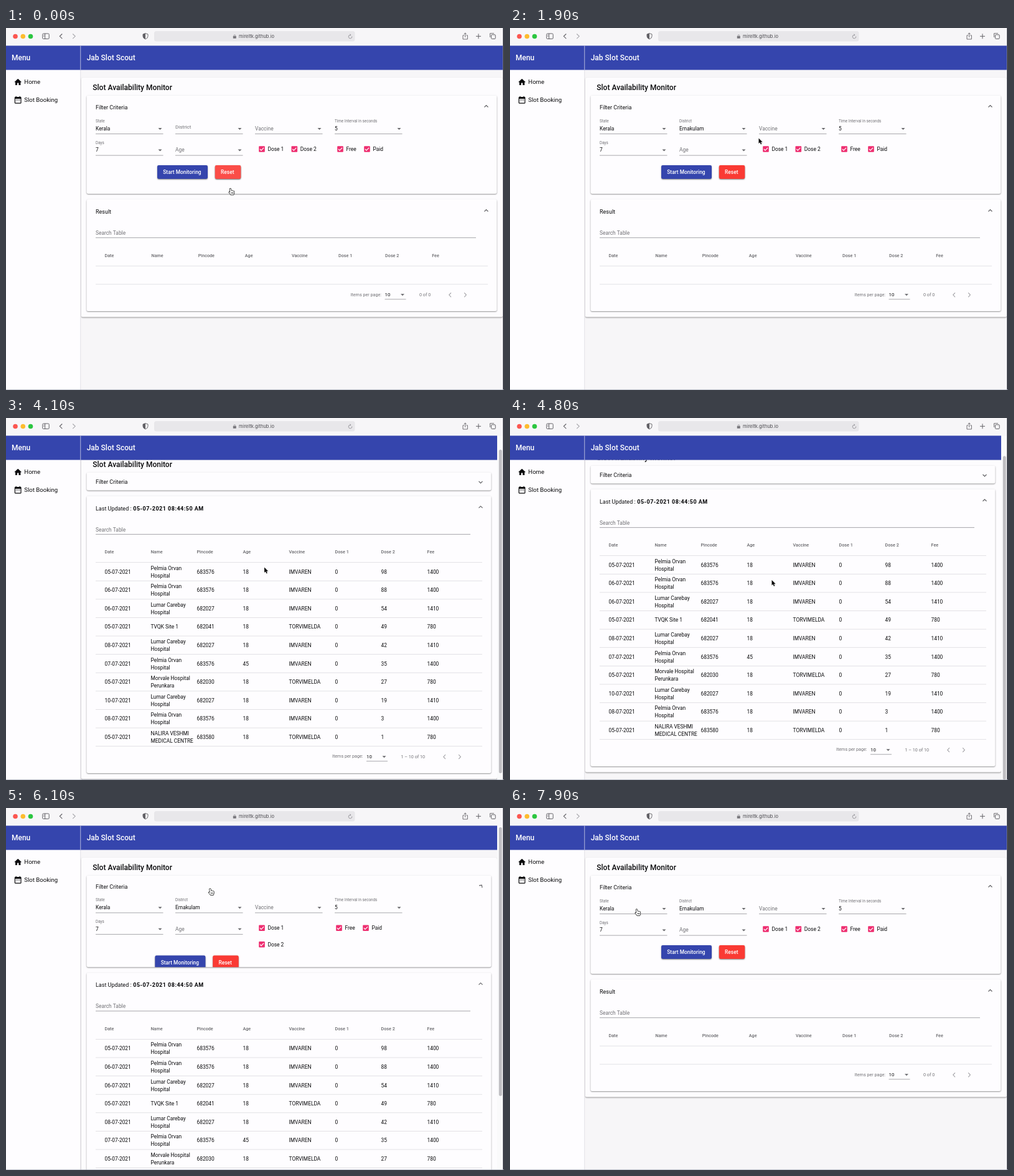
These frames come from a looping animation (800x583 px, 8 s). An HTML page with a canvas:

```html
<!DOCTYPE html>
<html lang="en">
<head>
<meta charset="utf-8">
<title>Slot Availability Monitor</title>
<style>
html, body { margin: 0; width: 100%; height: 100%; overflow: hidden; background: #f7f6f8; }
canvas { display: block; width: 800px; height: 583px; }
</style>
</head>
<body>
<canvas id="stage"></canvas>
<script>
const W = 800, H = 583, LOOP = 8000;
const cv = document.getElementById('stage'), g = cv.getContext('2d');
const dpr = window.devicePixelRatio || 1;
cv.width = W * dpr;
cv.height = H * dpr;

const INK = '#0b0b0d', GREY = '#717175', BLUE = '#3545ad', RED = '#fa3a34', PINK = '#ee2e70';
const BAR_TOP = 28.5, BAR_END = 67.5;

// Event times in ms
const PICK = 1650, START = 2736, DATA = 3200, EXPAND = 5983, RESET = 7050;

// time, x, y, pointing hand
const POINTER = [
  [0, 359.5, 258.5, 1], [150, 359, 255, 1], [700, 330, 160, 1], [1000, 330, 161, 1],
  [1450, 305, 186, 1], [1700, 306, 187, 1], [1900, 399.5, 177.5, 0], [2000, 402, 178, 0],
  [2500, 306, 231, 1], [2900, 306.5, 232, 1], [3300, 308, 233, 0], [3750, 400, 235, 0],
  [4100, 415, 240.5, 0], [4800, 420.5, 261, 0], [5300, 416, 240, 0], [5850, 327, 130, 1],
  [6200, 327, 130, 1], [6800, 352, 270, 1], [7150, 352, 270, 1], [7800, 202.5, 163, 1],
  [8000, 202.5, 163, 1]
];
const SCROLL = [[0, 0], [3750, 0], [4100, 21], [4400, 32], [5000, 32], [5450, 0], [8000, 0]];

const HOSP = {
  a: 'Pelmia Orvan|Hospital', b: 'Lumar Carebay|Hospital', c: 'TVQK Site 1',
  d: 'Morvale Hospital|Perunkara', e: 'NALIRA VESHMI|MEDICAL CENTRE'
};
const PIN = { a: 683576, b: 682027, c: 682041, d: 682030, e: 683580 };
const FEE = { a: 1400, b: 1410 };
// day, hospital, second doses, age
const ROWS = [
  [5, 'a', 98], [6, 'a', 88], [6, 'b', 54], [5, 'c', 49], [8, 'b', 42],
  [7, 'a', 35, 45], [5, 'd', 27], [10, 'b', 19], [8, 'a', 3], [5, 'e', 1]
];
const HEADS = ['Date', 'Name', 'Pincode', 'Age', 'Vaccine', 'Dose 1', 'Dose 2', 'Fee'];

const HOME = new Path2D('M10 20v-6h4v6h5v-8h3L12 3 2 12h3v8z');
const CALENDAR = new Path2D('M9 11H7v2h2zm4 0h-2v2h2zm4 0h-2v2h2zm2-7h-1V2h-2v2H8V2H6v2H5c-1.1 0-2 .9-2 2v14c0 1.1.9 2 2 2h14c1.1 0 2-.9 2-2V6c0-1.1-.9-2-2-2zm0 16H5V9h14z');
const ARROW = new Path2D('M0 0V8.6L2 6.8L3.4 10L4.9 9.3L3.5 6.3H6.2Z');
const HAND = new Path2D('M0 .8C0-.4 1.7-.4 1.8.8L2.3 3.6Q3.3 3 3.9 3.8Q4.9 3.3 5.4 4.2Q6.6 3.8 6.9 5V7.4L6 10H1.8L-.9 6.9Q-1.8 5.6-.5 5.5L.7 6.2Z');

const clamp = v => Math.max(0, Math.min(1, v));
const mix = (a, b, k) => a + (b - a) * k;

// Standard material curve: cubic-bezier(.4, 0, .2, 1)
function ease(x) {
  x = clamp(x);
  let lo = 0, hi = 1, s;
  for (let i = 0; i < 20; i++) {
    s = (lo + hi) / 2;
    const r = 1 - s;
    if (1.2 * r * r * s + .6 * r * s * s + s * s * s < x) lo = s; else hi = s;
  }
  return s * s * (3 - 2 * s);
}

function segment(keys, t) {
  let i = 0;
  while (i < keys.length - 2 && t >= keys[i + 1][0]) i++;
  const a = keys[i], b = keys[i + 1];
  return [a, b, clamp((t - a[0]) / (b[0] - a[0]))];
}

function text(s, x, cy, size = 8.4, color = INK, weight = 400, spacing = 0, family = 'Roboto') {
  g.font = `${weight} ${size}px ${family}, sans-serif`;
  g.letterSpacing = spacing + 'px';
  g.fillStyle = color;
  g.fillText(s, x, cy + size * .355);
}

function rect(x, y, w, h, color) {
  g.fillStyle = color;
  g.fillRect(x, y, w, h);
}

function round(x, y, w, h, r, color) {
  g.beginPath();
  g.roundRect(x, y, w, h, r);
  g.fillStyle = color;
  g.fill();
}

function line(points, color, width = 1) {
  g.beginPath();
  points.forEach(([x, y], i) => i ? g.lineTo(x, y) : g.moveTo(x, y));
  g.strokeStyle = color;
  g.lineWidth = width;
  g.stroke();
}

function disc(x, y, r, color) {
  g.beginPath();
  g.arc(x, y, r, 0, 7);
  g.fillStyle = color;
  g.fill();
}

function raised(x, y, w, h, color, alpha = .42) {
  g.save();
  g.shadowColor = `rgba(0,0,0,${alpha})`;
  g.shadowBlur = 2 * dpr;
  g.shadowOffsetY = dpr;
  round(x, y, w, h, 2.4, color);
  g.restore();
}

function chevron(x, y, turn) {
  g.save();
  g.translate(x, y);
  g.rotate(turn * Math.PI);
  line([[-3, 0], [0, -3], [3, 0]], '#5c5c60', 1.1);
  g.restore();
}

function caret(x, y) {
  g.beginPath();
  g.moveTo(x - 3, y - 1.5);
  g.lineTo(x + 3, y - 1.5);
  g.lineTo(x, y + 1.5);
  g.fillStyle = '#69696d';
  g.fill();
}

function icon(path, x, y) {
  g.save();
  g.translate(x, y);
  g.scale(.6, .6);
  g.fillStyle = '#0c0c0e';
  g.fill(path);
  g.restore();
}

function field(label, value, x, y, up = value ? 1 : 0) {
  text(label, x, y - 12 * up, 8.4 - 2.1 * up, GREY);
  if (value) text(value, x, y);
  caret(x + 103.5, y + .5);
  rect(x, y + 8.2, 108.5, .8, '#949498');
}

function check(label, x, y) {
  round(x - 4.8, y - 4.8, 9.6, 9.6, 1, PINK);
  line([[x - 3, y], [x - 1, y + 2.1], [x + 3.1, y - 2.2]], '#fff', 1.2);
  text(label, x + 9.5, y);
}

function button(label, x, y, w, color, glow = 0) {
  raised(x, y - 11, w, 22, color, .5 + glow);
  if (glow) round(x, y - 11, w, 22, 2.4, `rgba(255,255,255,${glow})`);
  text(label, x + 9.3, y, 8.4, '#fff', 500);
}

function browser() {
  rect(0, 0, W, H, '#f7f6f8');
  disc(15, 13.5, 3.8, '#fc5650');
  disc(27.3, 13.5, 3.8, '#fdbc2e');
  disc(39.5, 13.5, 3.8, '#2bc640');
  const ink = '#626166';
  g.lineWidth = 1;
  g.strokeStyle = ink;
  g.beginPath();
  g.roundRect(58.8, 9, 10.4, 8.5, 1.5);
  g.moveTo(62.6, 9);
  g.lineTo(62.6, 17.5);
  g.stroke();
  line([[60, 11.5], [61.5, 11.5]], ink, .7);
  line([[60, 13.5], [61.5, 13.5]], ink, .7);
  line([[90.3, 9.5], [86.3, 13.3], [90.3, 17.1]], ink, 1.1);
  line([[107.2, 9.5], [111.2, 13.3], [107.2, 17.1]], '#a9a8ad', 1.1);
  const shield = new Path2D('M224 8.6L228 10V13.3Q228 16.4 224 18Q220 16.4 220 13.3V10Z');
  g.lineWidth = .9;
  g.strokeStyle = ink;
  g.stroke(shield);
  g.fillStyle = ink;
  g.fill(new Path2D('M224 8.6V18Q220 16.4 220 13.3V10Z'));
  round(238, 5, 322.5, 16.5, 3.5, '#e8e7ea');
  round(364.8, 13, 5, 3.8, .6, '#77767b');
  g.beginPath();
  g.arc(367.3, 12.7, 1.5, Math.PI, 0);
  g.strokeStyle = '#77767b';
  g.lineWidth = .8;
  g.stroke();
  text('mireltk.github.io', 374, 13.6, 7.5, '#4b4a4f', 400, 0, 'Inter');
  g.beginPath();
  g.arc(553, 14, 2.8, -.2, 5);
  g.strokeStyle = '#88878c';
  g.stroke();
  line([[552.6, 9.7], [554, 11.2], [552.4, 12.5]], '#88878c', .8);
  line([[736, 11.8], [734, 11.8], [734, 18], [741.4, 18], [741.4, 11.8], [739.4, 11.8]], ink, .9);
  line([[737.7, 15], [737.7, 8]], ink, .9);
  line([[735.8, 9.8], [737.7, 7.9], [739.6, 9.8]], ink, .9);
  line([[755, 13.3], [763, 13.3]], ink);
  line([[759, 9.3], [759, 17.3]], ink);
  g.beginPath();
  g.roundRect(779.5, 10.8, 6.7, 6.7, 1);
  g.strokeStyle = ink;
  g.stroke();
  line([[777.6, 15], [777.6, 8.7], [784, 8.7]], ink, .9);
}

function sidebar() {
  rect(0, BAR_END, 119.5, H - BAR_END, '#fefdff');
  rect(119.4, BAR_END, .8, H - BAR_END, '#dedde1');
  icon(HOME, 12, 80);
  text('Home', 29.3, 87, 9.6);
  icon(CALENDAR, 12, 108.6);
  text('Slot Booking', 29.3, 116, 9.6);
}

function toolbar(right) {
  rect(0, BAR_TOP, right, BAR_END - BAR_TOP, BLUE);
  rect(119.4, BAR_TOP, .8, BAR_END - BAR_TOP, '#d3d5ea');
  text('Menu', 9, 48.2, 12, '#fff', 500);
  text('Jab Slot Scout', 129.7, 48.2, 12, '#fff', 500);
}

function filterPanel(t, top, height, right, open, wide) {
  raised(129.5, top, right - 129.5, height, '#fefdff');
  g.save();
  g.beginPath();
  g.rect(129.5, top, right - 129.5, height);
  g.clip();
  const head = top + 14.5 + 4.5 * open;
  text('Filter Criteria', 144, head + .4, 9);
  chevron(right - 17, head, 1 - open);
  if (open > 0) {
    g.translate(0, -9 * (1 - open));
    const settle = .2 * (1 - clamp(t / 100));
    const picked = t >= PICK;
    field('State', 'Kerala', 144, 162);
    field('District', picked ? 'Ernakulam' : '', 272, 162, picked ? ease((t - PICK) / 240) : settle);
    field('Vaccine', '', 400, 162);
    field('Time Interval in seconds', '5', 528, 162);
    field('Days', '7', 144, 196.5);
    field('Age', '', 272, 196.5);
    check('Dose 1', 411, 195);
    if (wide) check('Dose 2', 411, 221.5); else check('Dose 2', 463.3, 195);
    const dx = wide ? -2 : 0;
    check('Free', 537 + dx, 195);
    check('Paid', 580 + dx, 195);
    const by = wide ? 250.3 : 232, bx = wide ? -3.6 : 0;
    const glow = t < 350 ? .1 * (1 - t / 350) : t >= RESET ? .1 * clamp(1 - (t - RESET) / 400) : 0;
    const tap = t >= START ? .1 * clamp(1 - (t - START) / 200) : 0;
    button('Start Monitoring', 243 + bx, by, 81, BLUE, tap);
    button('Reset', 335.8 + bx, by, 41.5, RED, glow);
  }
  g.restore();
}

function tableRow([day, key, dose, age = 18], y, colX) {
  const hall = HOSP[key].split('|');
  const late = key === 'a' || key === 'b';
  text(String(day).padStart(2, '0') + '-07-2021', colX(0), y);
  hall.forEach((s, i) => text(s, colX(1), y + (hall.length > 1 ? i * 12 - 6 : 0)));
  [PIN[key], age, late ? 'IMVAREN' : 'TORVIMELDA', 0, dose, FEE[key] || 780]
    .forEach((s, i) => text(String(s), colX(i + 2), y));
}

function resultPanel(top, height, right, updated, full) {
  raised(129.5, top, right - 129.5, height, '#fefdff');
  if (updated) {
    text('Last Updated :', 144, top + 20, 9);
    text('05-07-2021 08:44:50 AM', 204.3, top + 20, 9, '#050507', 700, .48);
  } else {
    text('Result', 144, top + 20, 9);
  }
  chevron(right - 17, top + 19.5, 0);
  text('Search Table', 144, top + 54.2, 8.4, GREY);
  rect(144, top + 61.4, right - 33.5 - 144, .8, '#8f8f93');

  const pitch = full ? 74 : 75.1, colX = i => 158.5 + pitch * i;
  const rule = y => rect(144, y, right - 14.5 - 144, .8, '#dcdbdf');
  HEADS.forEach((s, i) => text(s, colX(i), top + 90.2, 7.2, '#69696d', 500));
  rule(top + 106.8);
  const count = full ? ROWS.length : 1;
  for (let i = 0; i < count; i++) {
    if (full) tableRow(ROWS[i], top + 122.2 + 29.6 * i, colX);
    rule(top + 136.4 + 29.6 * i);
  }

  const y = top + height - 26.6, x = full ? 579 : 608.5;
  text('Items per page:', x - 55, y - .5, 7.2, GREY);
  text('10', x, y - .4, 7.8);
  caret(x + 28.5, y + .3);
  rect(x, y + 7, 34, .8, '#949498');
  text(full ? '1 – 10 of 10' : '0 of 0', x + 55.5, y, 7.2, GREY);
  const ax = right - 75;
  line([[ax + 1.5, y - 3.2], [ax - 1.7, y + .3], [ax + 1.5, y + 3.8]], '#a3a2a7', 1.1);
  line([[ax + 22.7, y - 3.2], [ax + 25.9, y + .3], [ax + 22.7, y + 3.8]], '#a3a2a7', 1.1);
}

function pointer(t) {
  const [a, b, k] = segment(POINTER, t), e = k * k * (3 - 2 * k);
  g.save();
  g.translate(mix(a[1], b[1], e), mix(a[2], b[2], e));
  g.lineJoin = 'round';
  const hand = a[3], shape = hand ? HAND : ARROW;
  g.strokeStyle = hand ? '#0a0a0a' : '#fff';
  g.lineWidth = 1.4;
  g.stroke(shape);
  g.fillStyle = hand ? '#fff' : '#0a0a0a';
  g.fill(shape);
  if (hand) for (const x of [2.4, 3.9, 5.3]) line([[x, 6], [x, 8.3]], '#222', .7);
  g.restore();
}

function draw(t) {
  g.setTransform(dpr, 0, 0, dpr, 0, 0);
  const full = t >= DATA && t < RESET, updated = t >= START && t < RESET;
  const edge = full ? 789 : 798, right = full ? 779.5 : 788.5;
  const open = t >= RESET ? 1 : t >= EXPAND ? ease((t - EXPAND) / 225) : 1 - ease((t - START) / 225);
  const [a, b, k] = segment(SCROLL, t), scroll = mix(a[1], b[1], k);
  const top = 108.5, fh = 29 + open * (full ? 147.5 : 129.5);
  const rt = top + fh + 9, rh = 150.5 + 29.6 * (full ? ROWS.length : 1);
  const bottom = rt + rh + 9.5;

  browser();
  g.save();
  g.beginPath();
  g.rect(120, BAR_END, edge - 120, H - BAR_END);
  g.clip();
  g.translate(0, -scroll);
  raised(120.8, 80, edge - 120.8, bottom - 80, '#fdfcfe');
  text('Slot Availability Monitor', 139.3, 95.5, 12, INK, 500);
  filterPanel(t, top, fh, right, open, full);
  resultPanel(rt, rh, right, updated, full);
  g.restore();

  sidebar();
  toolbar(edge);
  if (full) {
    const view = H - 29, page = bottom + 12 - 29;
    rect(789, 29, 9.5, view, '#fafafb');
    round(791.8, 31 + scroll * view / page, 5, view * view / page - 3, 2.5, '#bfbec2');
  }
  rect(798.4, 0, 1.6, H, '#242733');
  rect(0, 582.3, W, .7, '#a5abb9');
  pointer(t);
}

function tick() {
  draw(performance.now() % LOOP);
  requestAnimationFrame(tick);
}
tick();
</script>
</body>
</html>
```
